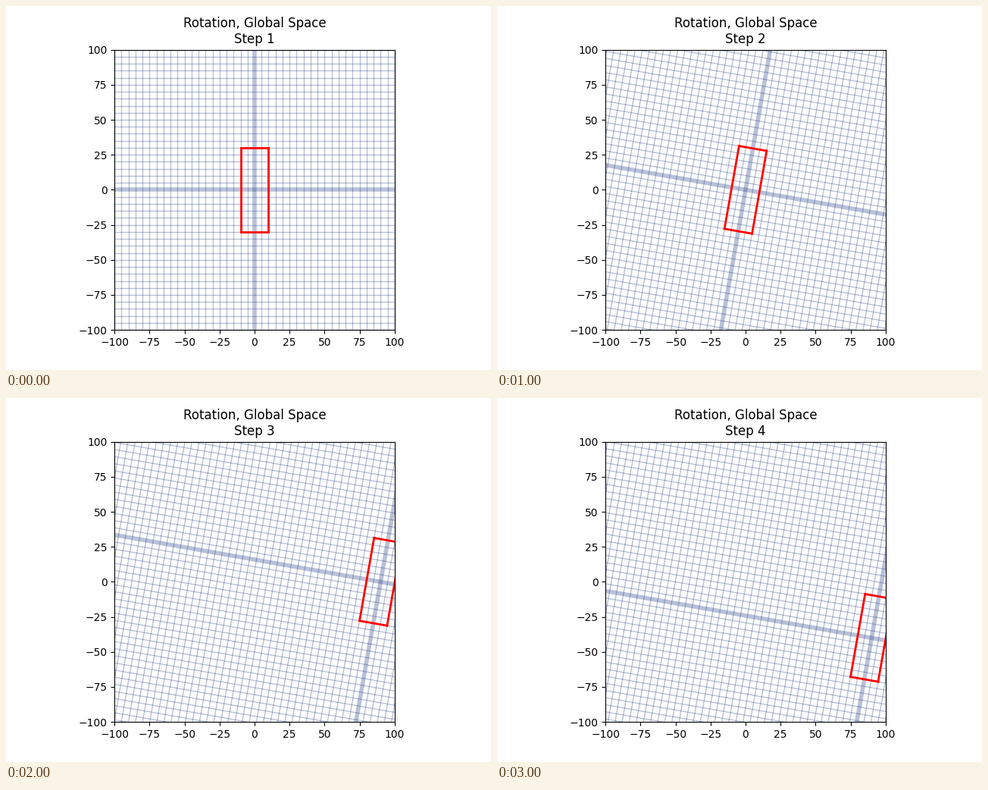
These frames come from a looping animation (640 px wide and 480 px high, 4 s). A matplotlib script:

```python
import numpy as np
import matplotlib.pyplot as plt
from matplotlib.animation import FuncAnimation

GRID_COLOR = (0.1, 0.2, 0.5, 0.3)
EXTENT = 400
SPACING = 5
# One pose per step: angle in degrees, then the x and y offset.
POSES = [(0, 0, 0), (-10, 0, 0), (-10, 90, 0), (-10, 90, -40)]

fig, ax = plt.subplots(figsize=(6.4, 4.8), dpi=100)
ax.set_aspect("equal")
ax.set_xlim(-100, 100)
ax.set_ylim(-100, 100)


def add_segment(start, end, **style):
    line, = ax.plot([], [], **style)
    return line, np.array([start, end], dtype=float)


def build_segments():
    segments = []
    for k in range(-EXTENT, EXTENT + 1, SPACING):
        style = dict(color=GRID_COLOR, linewidth=4 if k == 0 else 1)
        segments.append(add_segment((k, -EXTENT), (k, EXTENT), **style))
        segments.append(add_segment((-EXTENT, k), (EXTENT, k), **style))
    corners = [(-10, -30), (-10, 30), (10, 30), (10, -30)]
    for start, end in zip(corners, corners[1:] + corners[:1]):
        segments.append(add_segment(start, end, color="red", linewidth=2))
    return segments


segments = build_segments()


def update(step):
    angle, dx, dy = POSES[step]
    c, s = np.cos(np.radians(angle)), np.sin(np.radians(angle))
    rotation = np.array([[c, -s], [s, c]])
    for line, points in segments:
        line.set_data(*(rotation @ points.T + [[dx], [dy]]))
    title = ax.set_title(f"Rotation, Global Space\nStep {step + 1}")
    return [line for line, _ in segments] + [title]


anim = FuncAnimation(fig, update, frames=len(POSES), interval=1000, repeat=True)
plt.show()
```
